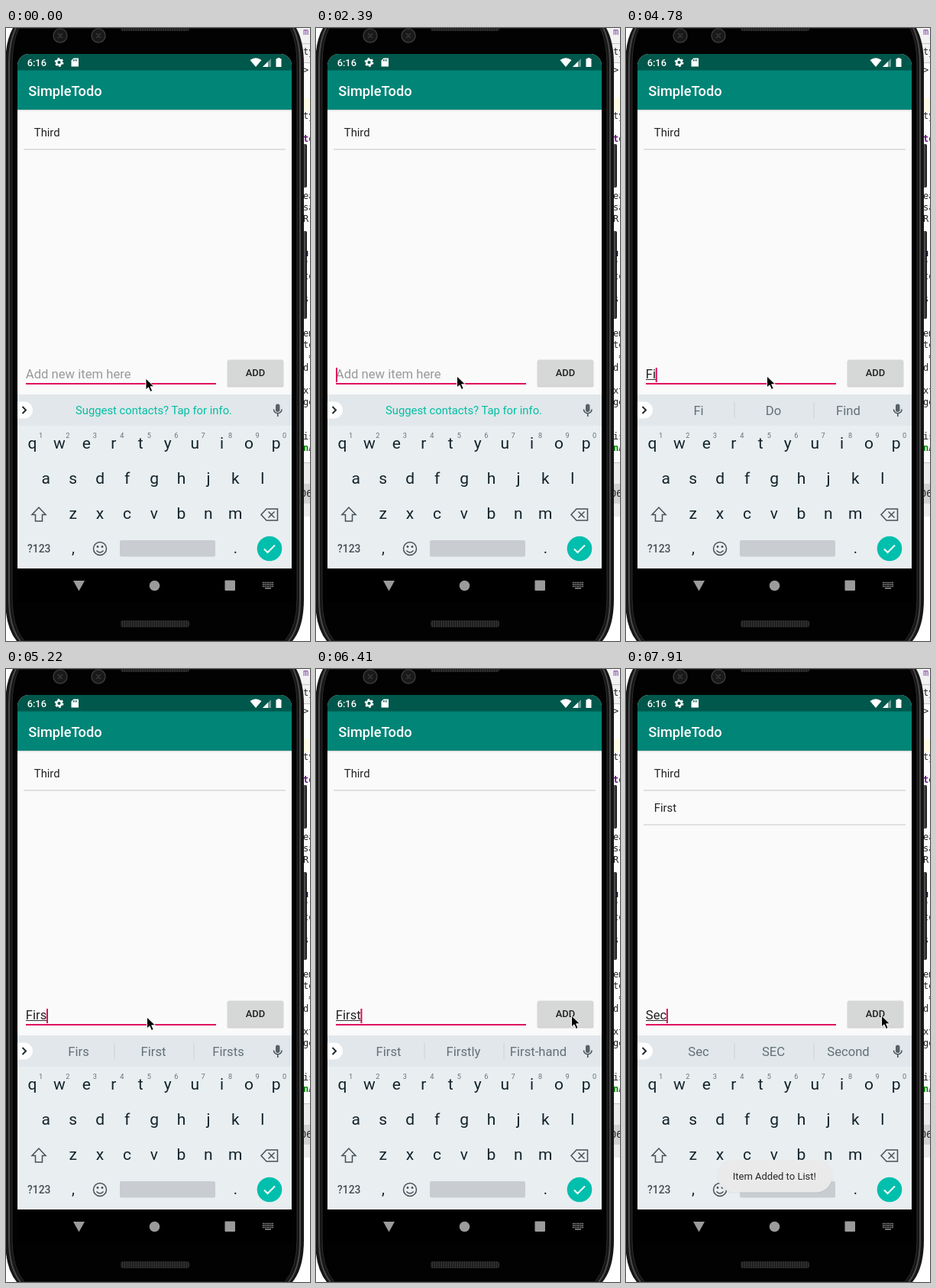
Write an HTML page that moves like this. It is 398 px wide and 803 px high and loops after 8 s.

```html
<!DOCTYPE html>
<html lang="en">
<head>
<meta charset="utf-8">
<title>Todo list on a phone</title>
<style>
  html, body { margin: 0; width: 100%; height: 100%; overflow: hidden; background: #fff; }
  svg { display: block; width: 398px; height: 803px; font-family: Roboto, sans-serif; }
  text { white-space: pre; }
  .code { font: 12px "DejaVu Sans Mono", monospace; }
  .mid { text-anchor: middle; }
  .medium { font-weight: 500; }
  .line { fill: none; stroke: #455055; stroke-width: 1.5; }
</style>
</head>
<body>
<svg viewBox="0 0 398 803" xmlns="http://www.w3.org/2000/svg">
  <defs>
    <linearGradient id="metal">
      <stop stop-color="#111"/><stop offset=".5" stop-color="#555"/><stop offset="1" stop-color="#111"/>
    </linearGradient>
    <pattern id="mesh" width="3" height="3" patternUnits="userSpaceOnUse">
      <rect width="3" height="3" fill="#303030"/><rect width="1.5" height="3" fill="#1c1c1c"/>
    </pattern>
    <clipPath id="screen"><path d="M15 708V49A15 15 0 0 1 30 34H359A15 15 0 0 1 374 49V708Z"/></clipPath>
  </defs>

  <!-- editor window behind the phone -->
  <rect width="398" height="803" fill="#fff"/>
  <rect x="380" width="18" height="46" fill="#f2f2f2"/>
  <rect x="380" y="46" width="18" height="538" fill="#fcfcfc"/>
  <path d="M380 20.5h18M380 45.5h18M380 569.5h18" stroke="#c4c4c4"/>
  <rect x="380" y="92" width="18" height="17" fill="#fffae3"/>
  <rect x="380" y="570" width="18" height="70" fill="#ececec"/>
  <rect x="380" y="597" width="18" height="26" fill="#d2d2d2"/>
  <g id="code" class="code"></g>

  <!-- phone body -->
  <rect x="387" y="152" width="7" height="57" rx="2" fill="url(#metal)"/>
  <rect x="387" y="266" width="7" height="115" rx="2" fill="url(#metal)"/>
  <path d="M9 0Q-1 18 -1 48V748Q-1 785 14 803H375Q390 785 390 748V48Q390 18 380 0Z" fill="#161616"/>
  <path d="M13 0Q4 18 4 48V748Q4 785 19 803M376 0Q385 18 385 48V748Q385 785 370 803" fill="none" stroke="#4a4a4a" stroke-width="2"/>
  <path d="M17 0Q8 18 8 48V748Q8 784 24 803H365Q381 784 381 748V48Q381 18 372 0Z" fill="#020202" stroke="#2c2c2c"/>
  <g stroke="#383838" stroke-width="1.5">
    <circle cx="71" cy="10" r="9" fill="#191919"/><circle cx="121" cy="10" r="9" fill="#191919"/>
    <path d="M68 7l6 6M118 7l6 6M74 7l-6 6M124 7l-6 6"/>
  </g>
  <rect x="150" y="-4" width="90" height="8" rx="3" fill="url(#mesh)"/>
  <rect x="150" y="776" width="90" height="9" rx="3" fill="url(#mesh)"/>

  <!-- app -->
  <g clip-path="url(#screen)">
    <rect x="15" y="34" width="359" height="674" fill="#fafafa"/>
    <rect x="15" y="55" width="359" height="52" fill="#008577"/>
    <rect x="15" y="34" width="359" height="21.5" fill="#00574b"/>
    <rect x="15" y="107" width="359" height="1.5" fill="#000" opacity=".12"/>
  </g>
  <g fill="#fff">
    <text class="medium" x="27.7" y="49.5" font-size="12.8">6:16</text>
    <circle cx="69.5" cy="45" r="3.3" fill="none" stroke="#fff" stroke-width="2.4"/>
    <circle cx="69.5" cy="45" r="5" fill="none" stroke="#fff" stroke-width="1.8" stroke-dasharray="2.6 2.636"/>
    <path d="M88.500 39.500H95V50.500H85.500V42.500Z"/>
    <path d="M88.500 41v2.500M90.500 41v2.500M92.500 41v2.500" stroke="#00574b"/>
    <path d="M319.500 42Q327 36.500 334.500 42L327 51Z"/>
    <path d="M336 51L347 40V51Z" fill-opacity=".4"/><path d="M336 51L343 44V51Z"/>
    <path d="M355.500 39h3v1.200h2V51h-7V40.200h2Z"/>
    <text class="medium" x="29.300" y="89" font-size="18.2">SimpleTodo</text>
  </g>
  <g font-size="14.8" fill="#212121">
    <text x="36.800" y="142">Third</text>
    <path d="M23 159H366" stroke="#d7d7d7" stroke-width="1.5"/>
    <g id="added"><text x="36.800" y="187">First</text><path d="M23 204H366" stroke="#d7d7d7" stroke-width="1.5"/></g>
  </g>

  <rect x="289.500" y="435.500" width="74" height="35" rx="2" fill="#000" opacity=".16"/>
  <rect id="button" x="290" y="434.500" width="73" height="34.500" rx="2"/>
  <text class="mid medium" x="326.500" y="456" font-size="12.950" fill="#212121">ADD</text>
  <path d="M26 466H275" stroke="#e00f5e" stroke-width="2"/>
  <text id="hint" x="25.800" y="458.500" font-size="16.650" fill="#999">Add new item here</text>
  <text id="typed" x="25.800" y="458.500" font-size="16.650" fill="#212121"></text>
  <rect id="underline" x="26" y="460" width="0" height="1" fill="#333"/>
  <rect id="caret" y="445" width="2" height="19" fill="#e00f5e"/>

  <!-- keyboard -->
  <rect x="15" y="480" width="359" height="228" fill="#e9eef1"/>
  <rect x="15" y="480" width="359" height="41" fill="#e1e7ea"/>
  <path d="M15 489.500H24A11 11 0 0 1 24 511.500H15Z" fill="#fff"/>
  <path d="M21.500 496l4.500 4.500-4.500 4.500" fill="none" stroke="#222b2f" stroke-width="2"/>
  <text id="contacts" class="mid" x="193.500" y="506" font-size="14.800" fill="#00bfa5">Suggest contacts? Tap for info.</text>
  <g id="suggest" class="mid" font-size="16.650" fill="#647176">
    <path d="M142 490V511M246 490V511" stroke="#cbd2d5"/>
    <text x="95" y="507"></text><text x="193" y="507"></text><text x="291" y="507"></text>
  </g>
  <rect x="353" y="492.500" width="5.500" height="10.500" rx="2.700" fill="#576267"/>
  <path class="line" d="M350.500 499.500a5.300 5.300 0 0 0 10.600 0M355.800 505v4"/>
  <g id="keys" class="mid" fill="#12242b"></g>
  <path class="line" d="M43 628l-9 9.500h4.500v8.500h9v-8.500H52Z"/>
  <path class="line" d="M341 630h14.500v15H341l-7-7.500ZM343.500 633.500l8 8M351.500 633.500l-8 8"/>
  <text class="medium" x="28" y="686.500" font-size="13.900" fill="#455055">?123</text>
  <circle class="line" cx="123" cy="682" r="8.500"/>
  <path class="line" d="M118.500 684.500q4.500 5 9 0"/>
  <circle cx="120" cy="679.500" r="1.400" fill="#455055"/><circle cx="126" cy="679.500" r="1.400" fill="#455055"/>
  <rect x="149" y="671" width="125" height="21.500" rx="2" fill="#c9cdd1"/>
  <circle cx="345" cy="682" r="16.300" fill="#00bfad"/>
  <path d="M338 682.500l4.500 4.500 9.500-9.500" fill="none" stroke="#fff" stroke-width="2"/>
  <g id="toast">
    <rect x="119.500" y="643.500" width="151" height="43" rx="21" fill="#000" opacity=".06"/>
    <rect x="120" y="643" width="150" height="42.500" rx="21" fill="#ebebeb" fill-opacity=".97"/>
    <text class="mid" x="194.300" y="668.500" font-size="13" fill="#262626">Item Added to List!</text>
  </g>

  <!-- navigation bar -->
  <rect x="15" y="708" width="359" height="44" fill="#000"/>
  <g fill="#9b9b9b">
    <path d="M88 724H103L95.500 737.500Z"/>
    <circle cx="194.500" cy="730.500" r="6.800"/>
    <rect x="286.500" y="723.500" width="13.500" height="13.500" rx="1"/>
    <path d="M336 726.500h14M336 729h14M336 731.500h14" stroke="#9b9b9b" stroke-width="1.400" stroke-dasharray="1.600 .880"/>
    <path d="M339 734h8" stroke="#9b9b9b" stroke-width="1.400"/>
  </g>

  <path id="mouse" d="M0 0V15L3.500 11.800 6 17.500 8.700 16.300 6.200 10.800H11Z" fill="#000" stroke="#fff"/>
</svg>
<script>
const byId = id => document.getElementById(id);
const svgNS = "http://www.w3.org/2000/svg";

function addText(parent, content, attrs) {
  const node = document.createElementNS(svgNS, "text");
  node.textContent = content;
  for (const name in attrs) node.setAttribute(name, attrs[name]);
  parent.append(node);
}

const codeLines = [
  [9, "m", "#7a3e9d"], [35, "ty"], [59, ">"], [119, "ty"], [149, "to", "#660e7a", "bold"], [163, "."],
  [224, "ea"], [239, "sa"], [254, "R"], [299, "u", "#000080", "bold"], [314, "/", "#999"], [329, "to"],
  [359, "s"], [404, "em"], [419, "te"], [434, " ="], [449, "d"], [479, "xt"], [494, "ge"],
  [539, "is"], [554, "nA", "#008000", "bold"], [614, "06"]
];
for (const [y, content, fill = "#222", weight = "normal"] of codeLines)
  addText(byId("code"), content, { x: y === 614 ? 386 : 389, y, fill, "font-weight": weight });

const keyRows = [["qwertyuiop", 34.5, 551], ["asdfghjkl", 52.3, 597], ["zxcvbnm", 87.6, 643]];
for (const [letters, left, y] of keyRows)
  [...letters].forEach((letter, i) => {
    const x = left + 35.45 * i;
    addText(byId("keys"), letter, { x, y, "font-size": 21 });
    if (y === 551) addText(byId("keys"), (i + 1) % 10, { x: x + 11, y: 537, "font-size": 9.2, fill: "#667278" });
  });
addText(byId("keys"), ",", { x: 88, y: 688, "font-size": 20 });
addText(byId("keys"), ".", { x: 300.5, y: 688, "font-size": 20 });

// Each entry changes only the listed properties.
const start = {
  mouse: [183, 459], caret: false, hint: true, typed: "", words: null,
  pressed: false, added: false, toast: 0
};
const changes = [
  [150, { mouse: [184.5, 456] }],
  [450, { caret: true }],
  [900, { caret: false }],
  [1490, { caret: true }],
  [1940, { caret: false }],
  [2390, { caret: true }],
  [2990, { caret: false }],
  [3440, { caret: true, hint: false }],
  [3740, { hint: true }],
  [4040, { caret: false }],
  [4490, { caret: true, hint: false, typed: "F" }],
  [4780, { typed: "Fi", words: ["Fi", "Do", "Find"] }],
  [4930, { typed: "Fir", words: ["Fir", "First", "Fire"] }],
  [5220, { typed: "Firs", words: ["Firs", "First", "Firsts"] }],
  [5370, { typed: "First", words: ["First", "Firstly", "First-hand"] }],
  [5820, { caret: false, mouse: [215, 457] }],
  [5970, { mouse: [279.5, 457.5] }],
  [6120, { mouse: [322, 455] }],
  [6270, { mouse: [334.5, 454], caret: true }],
  [6420, { pressed: true }],
  [6570, { pressed: false, added: true, typed: "", hint: true, words: null, toast: 0.3 }],
  [6710, { toast: 0.8 }],
  [6860, { toast: 1 }],
  [7010, { caret: false }],
  [7310, { caret: true, hint: false, typed: "S" }],
  [7610, { typed: "Se", words: ["Se", "See", "Set"] }],
  [7910, { typed: "Sec", words: ["Sec", "SEC", "Second"] }]
];

const show = (id, opacity) => byId(id).setAttribute("opacity", Number(opacity));
const slots = byId("suggest").querySelectorAll("text");

function draw(time) {
  const state = { ...start };
  for (const [at, change] of changes) if (time >= at) Object.assign(state, change);

  byId("mouse").setAttribute("transform", `translate(${state.mouse})`);
  byId("typed").textContent = state.typed;
  const width = state.typed ? byId("typed").getComputedTextLength() : 0;
  byId("underline").setAttribute("width", width);
  byId("caret").setAttribute("x", 26 + Math.max(0, width - 0.5));
  byId("button").setAttribute("fill", state.pressed ? "#c4c5c5" : "#d6d7d7");
  show("caret", state.caret);
  show("hint", state.hint);
  show("added", state.added);
  show("toast", state.toast);
  show("contacts", !state.words);
  show("suggest", state.words !== null);
  slots.forEach((slot, i) => { slot.textContent = state.words ? state.words[i] : ""; });
}

const begin = performance.now();
function tick() {
  draw((performance.now() - begin) % 8000);
  requestAnimationFrame(tick);
}
tick();
</script>
</body>
</html>
```
